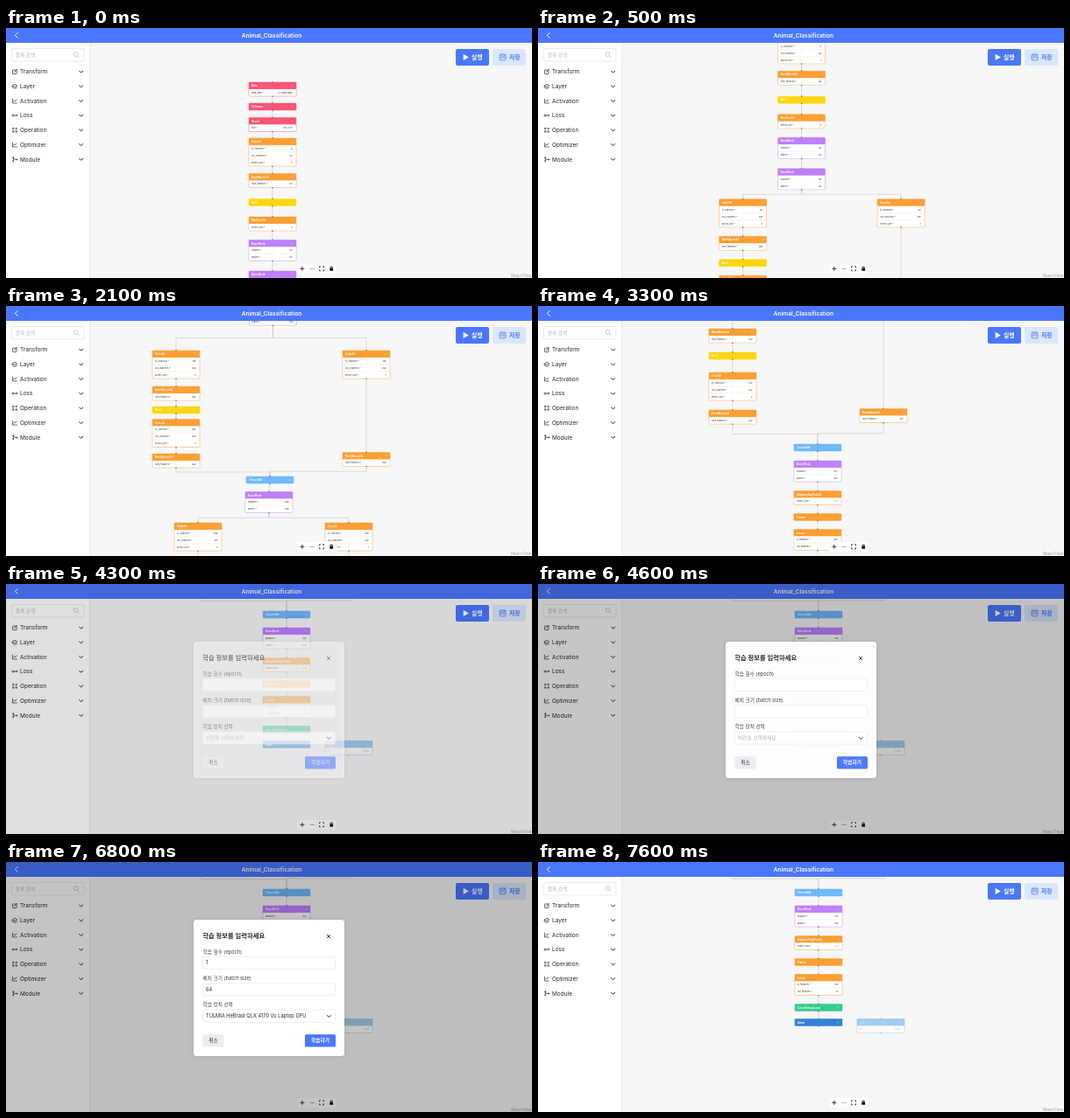
Write an HTML page with a canvas that moves like this. It is 600 by 286 pixels and loops after 8000 ms.

```html
<!DOCTYPE html>
<html lang="ko">
<head>
<meta charset="utf-8">
<title>Block editor</title>
<style>
html, body { margin: 0; width: 100%; height: 100%; overflow: hidden; background: #f7f7f8; }
canvas { display: block; width: 600px; height: 286px; }
</style>
</head>
<body>
<canvas id="stage"></canvas>
<script>
const W = 600, H = 286, LOOP = 8000, STEP = 100;
const canvas = document.getElementById('stage');
const c = canvas.getContext('2d');
const ratio = window.devicePixelRatio || 1;
canvas.width = W * ratio;
canvas.height = H * ratio;

const FONT = 'Inter, "Noto Sans CJK KR", "Noto Sans CJK", sans-serif';
const BLUE = '#4a77ff', INK = '#24262b';
const PINK = '#fb5578', ORANGE = '#ff9f33', YELLOW = '#ffd60a', PURPLE = '#bf80ff';
const SKY = '#70b8ff', GREEN = '#34cc90', NAVY = '#3281d8', AZURE = '#3a96dc';

// ---- drawing helpers ----
function text(s, x, y, size, color = INK, weight = 400, align = 'left') {
  c.font = `${weight} ${size}px ${FONT}`;
  c.fillStyle = color;
  c.textAlign = align;
  c.textBaseline = 'alphabetic';
  c.fillText(s, x, y + size * 0.36);
}
function box(x, y, w, h, r, fill, stroke, lw = 0.6) {
  c.beginPath();
  c.roundRect(x, y, w, h, r);
  if (fill) { c.fillStyle = fill; c.fill(); }
  if (stroke) { c.strokeStyle = stroke; c.lineWidth = lw; c.stroke(); }
}
function line(color, lw, ...paths) {
  c.strokeStyle = color;
  c.lineWidth = lw;
  c.beginPath();
  for (const p of paths)
    for (let i = 0; i < p.length; i += 2) i ? c.lineTo(p[i], p[i + 1]) : c.moveTo(p[0], p[1]);
  c.stroke();
}
function ring(x, y, r, color, lw) {
  c.beginPath();
  c.arc(x, y, r, 0, 7);
  c.strokeStyle = color;
  c.lineWidth = lw;
  c.stroke();
}
function chevron(x, y, r, color = INK, lw = 1) {
  line(color, lw, [x - r, y - r / 2, x, y + r / 2, x + r, y - r / 2]);
}

// ---- graph ----
const NODE_W = 54, ROW = 8;
const nodes = [], links = [];
function node(x, y, name, color, rows = [], dim = false) {
  const n = { x, y, name, color, rows, dim, top: y - 4, bottom: y + 4 + rows.length * ROW, mid: x + NODE_W / 2 };
  nodes.push(n);
  return n;
}
const conv = (x, y, a, b, k) => node(x, y, 'Conv2d', ORANGE, [['in_channels', a], ['out_channels', b], ['kernel_size', k]]);
const norm = (x, y, n) => node(x, y, 'BatchNorm2d', ORANGE, [['num_features', n]]);
const relu = (x, y) => node(x, y, 'ReLU', YELLOW);
const block = (x, y, n) => node(x, y, 'BasicBlock', PURPLE, [['inplanes', n], ['planes', n]]);
const add = (x, y) => node(x, y, 'TensorAdd', SKY);
function chain(...list) {
  for (let i = 1; i < list.length; i++) links.push([list[i - 1], list[i]]);
}
// Two parallel branches between a block and the add node that merges them.
function fork(from, to, lx, rx, base, ys, inCh, outCh) {
  const [y1, y2, y3, y4, y5, yr] = ys.map(y => y + base);
  chain(from, conv(lx, y1, inCh, outCh, 3), norm(lx, y2, outCh), relu(lx, y3),
    conv(lx, y4, outCh, outCh, 3), norm(lx, y5, outCh), to);
  chain(from, conv(rx, y1, inCh, outCh, 1), norm(rx, yr, outCh), to);
}

const b1 = block(277, 282, 64);
chain(
  node(277, 66, 'Data', PINK, [['data_path', 'C:/users/data']]),
  node(277, 90, 'ToTensor', PINK),
  node(277, 106.5, 'Resize', PINK, [['size', '224, 224']]),
  conv(277, 130, 3, 64, 7),
  norm(277, 170.5, 64),
  relu(277, 199.5),
  node(277, 220, 'MaxPool2d', ORANGE, [['kernel_size', 3]]),
  block(277, 246.5, 64),
  b1);
const a2 = add(279, 480.5), b2 = block(278.5, 498, 128);
fork(b1, a2, 210, 390.5, 234, [83, 125.5, 152, 170.5, 211, 211], 64, 128);
const a3 = add(275, 695), b3 = block(274, 712.5, 256);
fork(b2, a3, 168, 385, 496, [55, 96, 119, 133.5, 173, 171.5], 128, 256);
const a4 = add(290, 922);
fork(b3, a4, 193, 365, 760, [-12, 30, 57, 80, 123, 121.5], 256, 512);
chain(a2, b2);
chain(a3, b3);
chain(a4,
  block(290, 941, 512),
  node(290, 975.5, 'AdaptiveAvgPool2d', ORANGE, [['output_size', '1, 1']]),
  node(290, 1001.5, 'Flatten', ORANGE),
  node(290, 1019.5, 'Linear', ORANGE, [['in_features', 512], ['out_features', 10]]),
  node(290, 1053.5, 'CrossEntropyLoss', GREEN),
  node(290, 1070.5, 'Adam', NAVY));
node(361, 1070.5, 'SGD', AZURE, [['lr', '0.001']], true);

function drawNode(n) {
  const { x, top, bottom } = n;
  c.save();
  if (n.dim) c.globalAlpha = 0.45;
  box(x, top, NODE_W, bottom - top, 0.8, '#fff', n.color, 0.5);
  box(x, top, NODE_W, 8, 0.8, n.color);
  text(n.name, x + 3, n.y, 2.9, '#fff', 700);
  chevron(x + 49, n.y, 0.9, '#fff', 0.4);
  n.rows.forEach(([label, value], i) => {
    const y = n.y + ROW * (i + 1);
    box(x + 0.6, y - 3.7, 52.8, 7.3, 0.6, '#fff', '#f3e7dc', 0.35);
    line('#ececec', 0.4, [x + 27, y - 3.2, x + 27, y + 3.2]);
    text(label + ' *', x + 3, y, 2.5, '#333');
    text(String(value), x + 49.5, y, 2.5, '#333', 400, 'right');
  });
  c.fillStyle = '#777';
  c.fillRect(n.mid - 0.7, top - 0.9, 1.4, 1.3);
  c.fillRect(n.mid - 0.7, bottom - 0.4, 1.4, 1.3);
  c.restore();
}
function drawGraph(dx, dy) {
  c.save();
  c.beginPath();
  c.rect(96, 16, W, H);
  c.clip();
  c.translate(dx, dy);
  for (const [a, b] of links) {
    const m = (a.bottom + b.top) / 2;
    line('#bcbcc2', 0.5, [a.mid, a.bottom, a.mid, m, b.mid, m, b.mid, b.top]);
  }
  nodes.filter(n => n.bottom + dy > 0 && n.top + dy < H).forEach(drawNode);
  c.restore();
}

// ---- page frame ----
const icons = [
  (x, y) => { box(x - 2.5, y - 2, 4.6, 4.6, 0.7, null, INK, 0.7); line(INK, 0.8, [x - 0.8, y + 0.8, x + 2.8, y - 2.8]); },
  (x, y) => line(INK, 0.7, [x - 2.8, y - 0.7, x, y - 2.5, x + 2.8, y - 0.7, x, y + 0.8, x - 2.8, y - 0.7, x - 2.8, y + 1.2, x, y + 2.7, x + 2.8, y + 1.2]),
  (x, y) => line(INK, 0.7, [x - 2.6, y - 2.6, x - 2.6, y + 2.5, x + 2.8, y + 2.5], [x - 1.6, y + 1, x - 0.3, y - 0.8, x + 0.8, y + 0.2, x + 2.4, y - 1.8]),
  (x, y) => { ring(x - 2, y, 1, INK, 0.7); ring(x + 2.2, y - 0.3, 0.8, INK, 0.7); line(INK, 0.7, [x - 1, y, x + 1.4, y]); },
  (x, y) => { for (const [i, j] of [[-1, -1], [1, 1], [-1, 1]]) box(x + i * 1.7 - 0.8, y + j * 1.7 - 0.8, 1.6, 1.6, 0.4, null, INK, 0.7); ring(x + 1.7, y - 1.7, 0.8, INK, 0.7); },
  (x, y) => line(INK, 0.7, [x - 2.6, y - 2.6, x - 2.6, y + 2.5, x + 2.8, y + 2.5], [x - 1.6, y + 1, x - 0.3, y - 0.8, x + 0.8, y + 0.2, x + 2.4, y - 1.8]),
  (x, y) => { line(INK, 0.7, [x - 1.7, y - 2, x - 1.7, y + 2], [x - 1.7, y - 0.9, x + 0.2, y + 0.3, x + 2.4, y + 0.3]); for (const [i, j] of [[-1.7, -2], [-1.7, 2], [2.4, 0.3]]) ring(x + i, y + j, 0.6, INK, 0.7); }
];
const groups = ['Transform', 'Layer', 'Activation', 'Loss', 'Operation', 'Optimizer', 'Module'];

function drawChrome() {
  c.fillStyle = '#fff';
  c.fillRect(0, 16, 95.5, H);
  line('#e4e5e8', 0.7, [95.7, 16, 95.7, H]);
  c.fillStyle = BLUE;
  c.fillRect(0, 0, W, 17);
  line('#fff', 1, [13.6, 5.2, 10.4, 8.4, 13.6, 11.6]);
  text('Animal_Classification', 303, 8.4, 6.6, '#fff', 600, 'center');

  box(6.5, 23.5, 82.5, 14.5, 1.5, '#fff', '#dcdde1');
  text('블록 검색', 11, 30.5, 5.6, '#b5b7bd');
  ring(79.6, 30, 2.4, '#b5b7bd', 0.7);
  line('#b5b7bd', 0.7, [81.4, 31.8, 83.4, 33.8]);
  groups.forEach((name, i) => {
    const y = 50 + i * 16.7;
    icons[i](10, y);
    text(name, 16, y, 6.5, INK);
    chevron(85.7, y, 2.3);
  });

  box(513, 24, 38, 19, 2, BLUE);
  c.fillStyle = '#fff';
  c.beginPath();
  c.moveTo(521.7, 29.7);
  c.lineTo(527.8, 33.4);
  c.lineTo(521.7, 37.1);
  c.fill();
  text('실행', 531, 33.3, 6.8, '#fff', 600);
  box(555, 24, 38, 19, 2, '#dae7fb');
  box(563.2, 30, 6.8, 6.8, 0.8, null, BLUE, 0.8);
  line(BLUE, 0.7, [565, 30, 565, 32.2, 568.3, 32.2, 568.3, 30], [563.2, 34, 570, 34]);
  text('저장', 574, 33.3, 6.8, BLUE, 600);

  box(331.8, 269.4, 45.8, 12, 0.8, '#fefefe', '#eeeeef', 0.4);
  line(INK, 0.9, [335.4, 275.3, 340.4, 275.3], [337.9, 272.8, 337.9, 277.8]);
  c.fillStyle = '#777';
  for (let i = 0; i < 3; i++) c.fillRect(346.6 + i * 1.9, 274.9, 1.2, 0.9);
  for (const i of [-1, 1]) for (const j of [-1, 1])
    line(INK, 0.8, [360 + i * 2.5, 275.3 + j, 360 + i * 2.5, 275.3 + j * 2.5, 360 + i, 275.3 + j * 2.5]);
  box(369.3, 274.6, 3.8, 3.1, 0.5, '#111');
  line('#111', 0.7, [370.2, 274.8, 370.2, 273, 372.2, 273, 372.2, 274.8]);
  text('React Flow', 599, 283.8, 4.4, '#999', 400, 'right');
}

// ---- dialog ----
const device = 'TULMIA HeBrast QLX 4170 Vo Laptop GPU';
const typed = (s, t, from, gap) => s.slice(0, t < from ? 0 : Math.floor((t - from) / gap) + 1);

function field(label, y, value, color = INK) {
  text(label, 224.5, y, 5.65, '#3a3c42');
  box(224.5, y + 5.7, 151.2, 14.2, 1.2, '#fff', '#e3e5e9');
  text(value, 228, y + 12.8, 5.7, color);
}
function drawDialog(t, alpha) {
  c.fillStyle = `rgba(0,0,0,${0.23 * alpha})`;
  c.fillRect(0, 0, W, H);
  c.save();
  c.globalAlpha = alpha;
  c.shadowColor = 'rgba(0,0,0,.12)';
  c.shadowBlur = 5 * ratio;
  box(214, 66, 172, 156, 3.5, '#fff');
  c.shadowColor = 'transparent';
  text('학습 정보를 입력하세요', 224.3, 84, 7.3, INK, 600);
  line(INK, 0.9, [366.1, 83.1, 369.9, 86.9], [369.9, 83.1, 366.1, 86.9]);
  field('학습 횟수 (epoch)', 102.5, typed('1', t, 5400, 100));
  field('배치 크기 (batch size)', 132.9, typed('64', t, 5800, 100));
  const chosen = t >= 6700;
  field('학습 장치 선택', 163.3, chosen ? device : '버전을 선택하세요', chosen ? INK : '#a9abb1');
  chevron(368.3, 176.4, 2.2);
  box(224.3, 197.3, 24.2, 14.2, 1.5, '#ebecef');
  text('취소', 236.4, 204.3, 5.7, INK, 400, 'center');
  box(341, 197.3, 35, 14.2, 1.5, BLUE);
  text('학습하기', 358.4, 204.3, 5.7, '#fff', 600, 'center');
  c.restore();
}

// ---- timeline: time, pan x, pan y ----
const pan = [
  [0, 0, 0], [900, -6, -211], [1000, -6, -211], [1100, -7, -234], [1400, -9, -316], [1500, -9, -316],
  [2100, -1, -496], [2400, 0, -570], [2600, 0, -620], [2700, 0, -620],
  [3300, 2, -760], [3500, 2, -803], [3600, 2, -803], [4000, 3, -887], [LOOP, 3, -887]
];
function panAt(t) {
  const i = pan.findIndex(k => k[0] > t);
  const [t0, x0, y0] = pan[i - 1], [t1, x1, y1] = pan[i];
  const u = (t - t0) / (t1 - t0);
  return [x0 + (x1 - x0) * u, y0 + (y1 - y0) * u];
}
const clamp = u => Math.max(0, Math.min(1, u));
function dialogAlpha(t) {
  const rise = 1 - (1 - clamp((t - 4150) / 650)) ** 3;
  return rise * clamp((7600 - t) / 400);
}

function draw(t) {
  c.setTransform(ratio, 0, 0, ratio, 0, 0);
  c.fillStyle = '#f7f7f8';
  c.fillRect(0, 0, W, H);
  drawGraph(...panAt(t));
  drawChrome();
  const alpha = dialogAlpha(t);
  if (alpha > 0) drawDialog(t, alpha);
}
function tick() {
  draw(Math.floor(performance.now() % LOOP / STEP) * STEP);
  requestAnimationFrame(tick);
}
tick();
</script>
</body>
</html>
```
